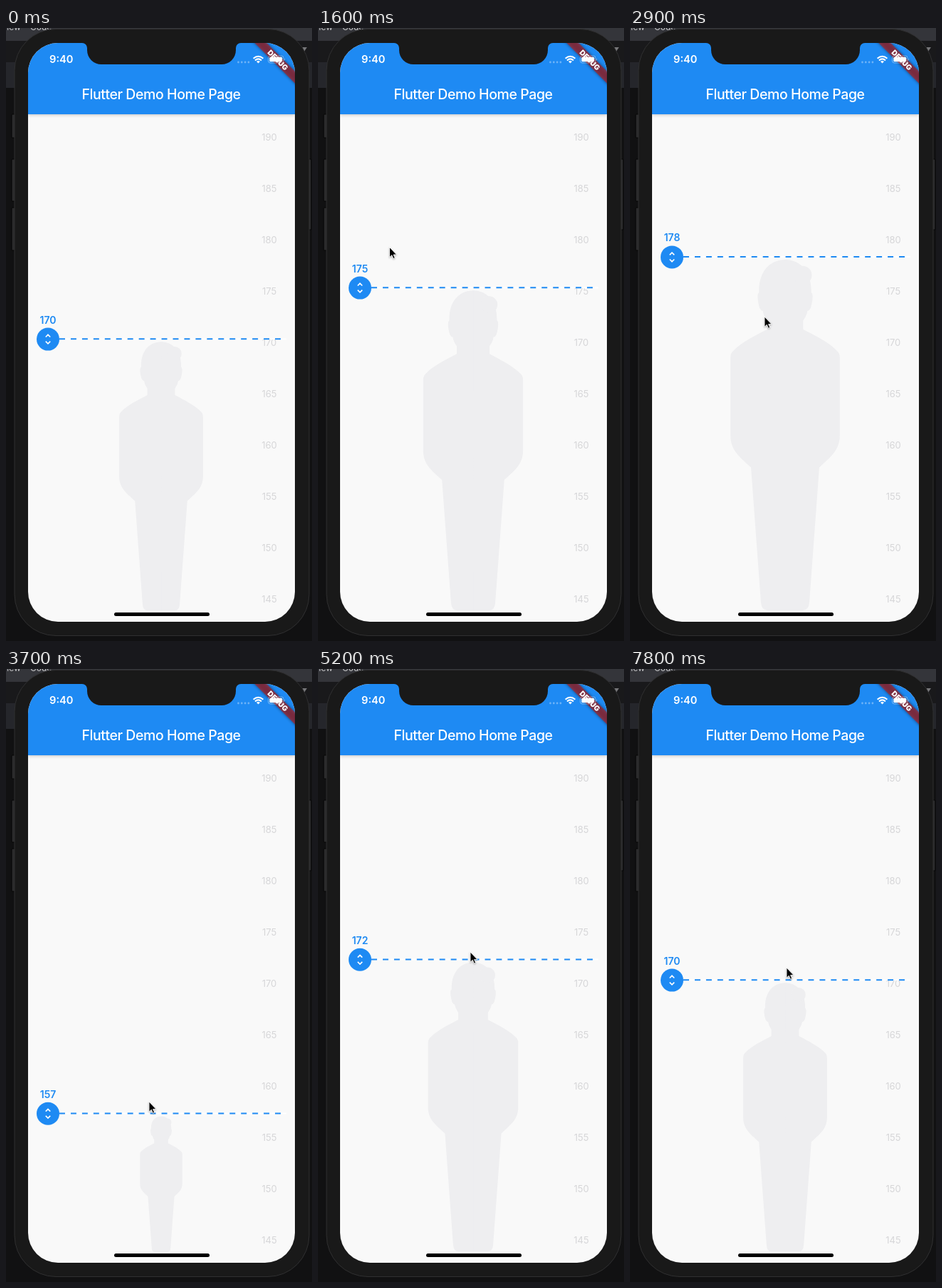
Write an HTML page that moves like this. It is 430 px wide and 860 px high and loops after 8000 ms.

```html
<!DOCTYPE html>
<html lang="en">
<head>
<meta charset="utf-8">
<title>Height picker</title>
<style>
  html, body { margin: 0; width: 100%; height: 100%; overflow: hidden; background: #111112; }
  svg { display: block; width: 430px; height: 860px; font-family: Inter, sans-serif; }
  #appbar { filter: drop-shadow(0 1.5px 2px rgba(0, 0, 0, .22)); }
  #banner rect { filter: drop-shadow(0 0 2px rgba(0, 0, 0, .8)); }
  #cursor { filter: drop-shadow(0 1px 1px rgba(0, 0, 0, .3)); }
</style>
</head>
<body>
<svg viewBox="0 0 430 860">
  <defs>
    <clipPath id="screen"><rect x="31" y="21" width="375" height="812" rx="42"/></clipPath>
  </defs>

  <!-- desktop behind the phone -->
  <rect width="430" height="18" fill="#34353a"/>
  <rect y="18" width="430" height="30" fill="#19191b"/>
  <rect y="48" width="430" height="36" fill="#25262b"/>
  <g fill="#c8c8ca" font-size="12">
    <text x="-7" y="3">View</text>
    <text x="34" y="3">Code</text>
  </g>
  <path d="M416 27h7l-4 6z" fill="#77777a"/>

  <!-- phone body -->
  <g fill="#2b2b2c" stroke="#050505">
    <rect x="8" y="121" width="8" height="33" rx="1"/>
    <rect x="8" y="184" width="8" height="59" rx="1"/>
    <rect x="8" y="252" width="8" height="60" rx="1"/>
    <rect x="421" y="184" width="8" height="99" rx="1"/>
  </g>
  <rect x="12" y="1.5" width="414" height="851" rx="58" fill="#191919" stroke="#303031"/>

  <g clip-path="url(#screen)">
    <rect x="31" y="21" width="375" height="812" fill="#f9f9f9"/>

    <!-- one half of the body, mirrored about x = 0, feet at y = 0 -->
    <g id="person" fill="#eeeef0">
      <path id="half" d="M-1-565C28-565 43-542 42-512C46-511 44-496 41-487Q38-482 36-483Q35-475 29-467V-453C52-441 70-432 83-419Q88-415 88-408V-282C88-258 72-247 55-231L39-14Q38-1 28-1H-1Z"/>
      <use href="#half" transform="scale(-1 1)"/>
      <circle cx="28" cy="-540" r="15"/>
    </g>
    <g id="scale" fill="#d6d6d8" font-size="13" text-anchor="middle"></g>

    <g id="slider">
      <path d="M75 0H394" stroke="#fff" stroke-width="2"/>
      <path d="M75 0H394" stroke="#1e8af3" stroke-width="2" stroke-dasharray="7.975"/>
      <circle cx="59" cy=".4" r="16" fill="#1e8af3"/>
      <path transform="translate(49 -9.6) scale(.8333)" fill="#fff" d="M12 5.83L15.17 9l1.41-1.41L12 3 7.41 7.59 8.83 9zM12 18.17L8.83 15l-1.41 1.41L12 21l4.59-4.59L15.17 15z"/>
      <text id="value" x="59" y="-21.6" fill="#1e8af3" font-size="14" font-weight="600" text-anchor="middle"></text>
    </g>

    <rect id="appbar" x="31" y="21" width="375" height="100" fill="#1e8af3"/>
    <text x="218" y="100" fill="#fff" font-size="19.5" font-weight="500" letter-spacing="-.42" text-anchor="middle">Flutter Demo Home Page</text>

    <g id="banner" transform="translate(406 21) rotate(45)">
      <rect x="-48" y="28" width="96" height="12" fill="#b71c1c" fill-opacity=".63"/>
      <text y="37.7" fill="#fff" font-size="10.2" font-weight="900" text-anchor="middle">DEBUG</text>
    </g>

    <!-- status bar -->
    <g fill="#fff">
      <text x="61" y="49.3" font-size="14.7" font-weight="600">9:40</text>
      <path d="M326.5 48H342" stroke="#fff" stroke-opacity=".35" stroke-width="2.8" stroke-linecap="round" stroke-dasharray="0 4.8"/>
      <path d="M354.5 49.5L352 47Q354.5 45 357 47Z"/>
      <path d="M347.6 42.8Q354.5 36.6 361.4 42.8M350 45.4Q354.5 41.4 359 45.4" fill="none" stroke="#fff" stroke-width="2"/>
      <rect x="368.5" y="39" width="21.5" height="10" rx="3" fill="none" stroke="#fff" stroke-opacity=".4"/>
      <rect x="370.3" y="40.8" width="17.9" height="6.4" rx="1.5"/>
      <path d="M391.3 42.5q2 1.5 0 3z" fill-opacity=".5"/>
    </g>
  </g>

  <path d="M107 20H330V21A7 7 0 0 0 323 28V31A20 20 0 0 1 303 51H134A20 20 0 0 1 114 31V28A7 7 0 0 0 107 21Z" fill="#191919"/>
  <rect x="152" y="820" width="134" height="5" rx="2.5"/>
  <path id="cursor" d="M0 0V14.3L3.3 11.3 5.4 16.2 7.7 15.2 5.6 10.6H10Z" stroke="#fff" stroke-width=".9"/>
</svg>

<script>
const LOOP = 8000, STEP = 100, LAG = 100;
const UNIT = 14.4, BASE = 170, BASE_LINE = 436.2, BASE_POINTER = 419.5;
const FLOOR = 818, FULL_HEIGHT = 565;
const $ = id => document.getElementById(id);

// The pointer rests between gestures; only drags move the slider.
const move = (from, to, x, y) => ({ from, to, x, y });
const drag = (...args) => ({ ...move(...args), pressed: true });
const gestures = [
  move(800, 1310, 100, 419),
  drag(1310, 2350, 101, 186.5),
  drag(2350, 2600, 106, 304),
  move(2600, 2900, 189, 405),
  drag(2900, 3400, 201, 607),
  drag(3900, 4400, 210, 418),
  drag(4700, 5100, 214, 397),
  drag(5200, 5700, 220, 419)
];

const easeOut = u => 1 - (1 - u) ** 2;

function pointerAt(t) {
  let x = 92, y = 430, dragY = BASE_POINTER;
  for (const g of gestures) {
    if (t < g.from) break;
    const u = easeOut(Math.min(1, (t - g.from) / (g.to - g.from)));
    x += (g.x - x) * u;
    y += (g.y - y) * u;
    if (g.pressed) dragY = y;
  }
  return { x, y, dragY };
}

for (let h = 145; h <= 190; h += 5) {
  const label = document.createElementNS($("scale").namespaceURI, "text");
  label.setAttribute("x", 370);
  label.setAttribute("y", 157.5 + (190 - h) * UNIT);
  label.textContent = h;
  $("scale").append(label);
}

function draw(t) {
  const { x, y } = pointerAt(t);
  const steps = Math.round((BASE_POINTER - pointerAt(t - LAG).dragY) / UNIT);
  const line = BASE_LINE - steps * UNIT;
  const size = (FLOOR - line - 4) / FULL_HEIGHT;
  $("value").textContent = BASE + steps;
  $("slider").setAttribute("transform", `translate(0 ${line})`);
  $("person").setAttribute("transform", `translate(218 ${FLOOR}) scale(${size})`);
  $("cursor").setAttribute("transform", `translate(${x} ${y})`);
  $("cursor").style.visibility = t < gestures[0].from ? "hidden" : "visible";
}

const start = performance.now();
function tick() {
  const t = (performance.now() - start) % LOOP;
  draw(Math.floor(t / STEP) * STEP);
  requestAnimationFrame(tick);
}
tick();
</script>
</body>
</html>
```
